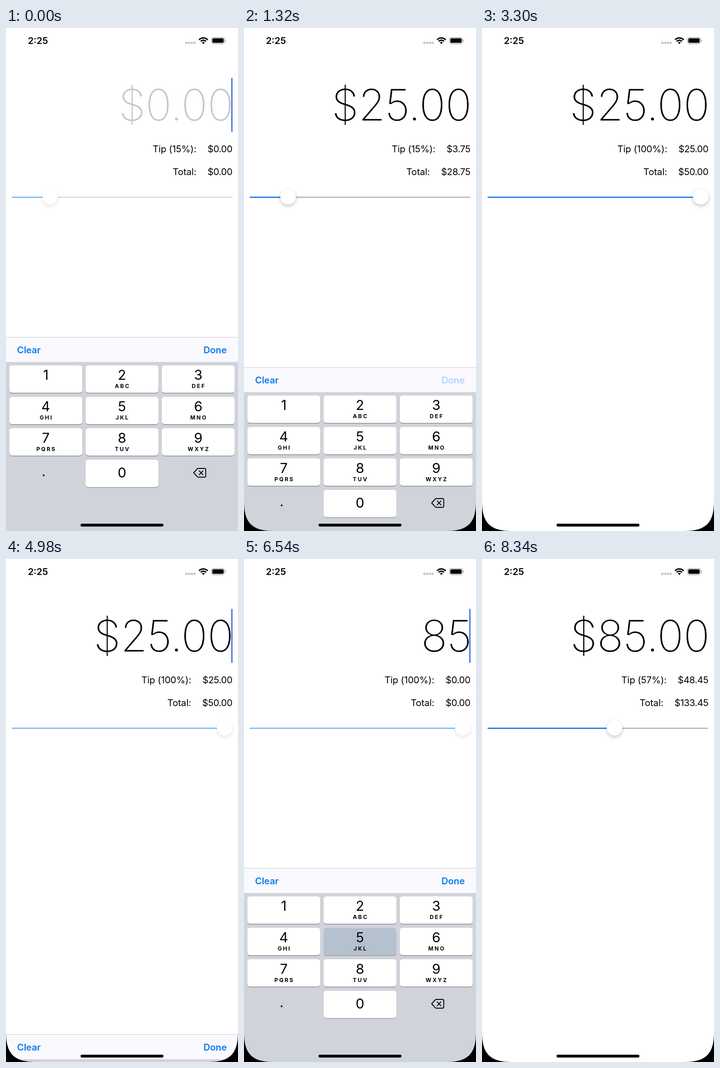
Recreate the animation shown at these times as an HTML page with a canvas. Size 509 by 1101 pixels, loop 8.4 s.

```html
<!DOCTYPE html>
<html lang="en">
<head>
<meta charset="utf-8">
<title>Tip calculator</title>
<style>
html, body { margin: 0; width: 100%; height: 100%; overflow: hidden; background: #fff; }
canvas { display: block; }
</style>
</head>
<body>
<canvas id="stage" width="509" height="1101"></canvas>
<script>
const W = 509, H = 1101, LOOP = 8400, STEP = 60;
const BLUE = '#0f7af5', BAR_BLUE = '#0a7aee';
const g = document.getElementById('stage').getContext('2d');
const clamp = v => Math.max(0, Math.min(1, v));
const money = v => '$' + v.toFixed(2);

// Timeline: what the amount field shows from each moment on
const entries = [[0, ''], [180, '2'], [480, '25'], [1320, '$25.00'],
  [5580, ''], [6180, '8'], [6480, '85'], [7080, '$85.00']];
// Key presses: key, down, up
const presses = [['2', 180, 240], ['5', 480, 780], ['8', 6180, 6360], ['5', 6480, 6780]];
// Caret: appears, starts to fade
const blinks = [[0, 760], [1140, 1900], [4980, 5260], [5580, 5900], [6180, 6760]];
// Slider thumb: time, centre x
const drag = [[0, 96.7], [1980, 96.7], [2220, 162], [2580, 162], [2640, 167.5],
  [2700, 167.5], [3300, 480], [7860, 480], [8340, 290.5], [LOOP, 290.5]];

const latest = (list, t) => list.filter(e => e[0] <= t).pop();
const isEditing = t => t < 1320 || (t >= 4980 && t < 7080);

function thumbAt(t) {
  const i = drag.findIndex(k => k[0] > t);
  const [t0, x0] = drag[i - 1], [t1, x1] = drag[i];
  const u = (t - t0) / (t1 - t0);
  return x0 + (x1 - x0) * u * u * (3 - 2 * u);
}

// Critically damped spring, 0 to 1
function spring(ms) {
  const x = Math.max(0, ms) * 0.026;
  return 1 - (1 + x) * Math.exp(-x);
}

function keyboardOffset(t) {
  if (t < 4900) return 424 * spring(t - 1293.2);
  if (t < 7000) return 424 * (1 - spring(t - 4954.7));
  return 424 * spring(t - 7065);
}

function caretAlpha(t) {
  return isEditing(t) ? 1 - clamp((t - latest(blinks, t)[1]) / 140) : 0;
}

// Opacity of a bar button tapped at the given moment
const tapped = (t, at) => t < at ? 1 : 0.3 + 0.7 * clamp((t - at - 60) / 240);

function pressLevel(key, t) {
  const hit = presses.find(([k, down, up]) => k === key && t >= down && t < up + 120);
  return hit ? 1 - clamp((t - hit[2] + 40) / 140) : 0;
}

function rect(x, y, w, h, color, r = 0) {
  g.fillStyle = color;
  g.beginPath();
  g.roundRect(x, y, w, h, r);
  g.fill();
}

function setFont(size, weight, spacing) {
  g.font = `${weight} ${size}px Inter, sans-serif`;
  g.letterSpacing = spacing + 'px';
}

function label(str, x, y, { size = 20.3, weight = 400, spacing = -0.1, color = '#000', align = 'left' } = {}) {
  setFont(size, weight, spacing);
  g.fillStyle = color;
  g.textAlign = align;
  g.fillText(str, x, y);
  return g.measureText(str).width;
}

function statusBar() {
  label('2:25', 70, 35, { weight: 600, spacing: 0, align: 'center' });
  for (let i = 0; i < 4; i++) rect(393.2 + i * 6, 30, 5, 5, '#c6c6c8', 1.8);

  g.strokeStyle = '#000';
  g.lineWidth = 3;
  for (const r of [13, 8]) {
    g.beginPath();
    g.arc(433, 34.8, r, -Math.PI * 0.76, -Math.PI * 0.24);
    g.stroke();
  }
  g.fillStyle = '#000';
  g.beginPath();
  g.moveTo(433, 35);
  g.arc(433, 35, 4.6, -Math.PI * 0.76, -Math.PI * 0.24);
  g.fill();

  g.strokeStyle = '#a5a5a7';
  g.lineWidth = 1.2;
  g.beginPath();
  g.roundRect(450.6, 20.6, 29, 14, 4.2);
  g.stroke();
  rect(452.6, 22.6, 25, 10, '#000', 2.6);
  rect(480.9, 25.3, 1.6, 4.8, '#a5a5a7', 1);
}

function amountField(t) {
  const entry = latest(entries, t)[1], str = entry || '$0.00';
  setFont(96, 200, -0.6);
  g.textAlign = 'left';
  g.fillStyle = entry ? '#000' : '#c5c5c8';
  const x = 493.7 - g.measureText(str).actualBoundingBoxRight;
  g.fillText(str, x, 203);
  // A white outline trims the strokes to a thinner weight
  g.strokeStyle = '#fff';
  g.lineWidth = 0.8;
  g.strokeText(str, x, 203);

  g.globalAlpha = caretAlpha(t);
  rect(494.3, 109, 2.6, 118.5, '#3763df', 1.2);
  g.globalAlpha = 1;
}

function resultRow(name, value, y) {
  const w = label(money(value), 496.7, y, { spacing: -0.35, align: 'right' });
  label(name, 496.7 - w - 24.6, y, { align: 'right' });
}

function slider(x, dim) {
  rect(12.3, 369.2, 484.4, 2.6, dim ? '#d9d9dc' : '#b3b3b6', 1.3);
  rect(12.3, 369.2, x - 12.3, 2.6, dim ? '#78bbf8' : BLUE, 1.3);
  g.save();
  g.shadowColor = `rgba(0,0,0,${dim ? 0.11 : 0.23})`;
  g.shadowBlur = 9;
  g.shadowOffsetY = 3.5;
  g.fillStyle = '#fff';
  g.beginPath();
  g.arc(x, 369.5, 17, 0, 7);
  g.fill();
  g.restore();
}

function backspace() {
  g.strokeStyle = '#000';
  g.lineWidth = 1.9;
  g.lineJoin = g.lineCap = 'round';
  g.beginPath();
  g.moveTo(411.8, 973.5);
  g.lineTo(419.6, 965);
  g.quadraticCurveTo(420.6, 964, 422, 964);
  g.lineTo(435, 964);
  g.quadraticCurveTo(438.3, 964, 438.3, 967.3);
  g.lineTo(438.3, 980);
  g.quadraticCurveTo(438.3, 983.3, 435, 983.3);
  g.lineTo(422, 983.3);
  g.quadraticCurveTo(420.6, 983.3, 419.6, 982.2);
  g.closePath();
  g.moveTo(423.9, 969.4);
  g.lineTo(432.1, 977.8);
  g.moveTo(432.1, 969.4);
  g.lineTo(423.9, 977.8);
  g.stroke();
}

function key(digit, letters, col, row, t) {
  const x = 7.3 + col * 167.2, y = 738.5 + row * 68.8, mid = x + 80;
  rect(x, y + 1.4, 160, 60, '#898b90', 6);
  rect(x, y, 160, 60, '#fff', 6);
  g.globalAlpha = pressLevel(digit, t);
  rect(x, y, 160, 60, '#b6c1cf', 6);
  g.globalAlpha = 1;
  label(digit, mid, y + (row === 3 ? 39.5 : 31.8), { size: 30, spacing: 0, align: 'center' });
  label(letters, mid + 1.3, y + 49.8, { size: 12, weight: 700, spacing: 2.7, align: 'center' });
}

function keyboard(t) {
  const off = keyboardOffset(t);
  if (off > 423.5) return;
  g.save();
  g.translate(0, Math.round(off));
  rect(0, 676.5, W, 55, '#faf9fd');
  rect(0, 676.2, W, 1.2, '#d3d4d6');
  rect(0, 731, W, 370, '#d1d3db');

  const bar = { weight: 600, color: BAR_BLUE };
  g.globalAlpha = t < 5580 ? 1 : tapped(t, 5580);
  label('Clear', 24.3, 711.5, bar);
  g.globalAlpha = t < 4900 ? tapped(t, 1320) : tapped(t, 7080);
  label('Done', 484.3, 711.5, { ...bar, align: 'right' });
  g.globalAlpha = 1;

  ['', 'ABC', 'DEF', 'GHI', 'JKL', 'MNO', 'PQRS', 'TUV', 'WXYZ']
    .forEach((s, i) => key(String(i + 1), s, i % 3, Math.floor(i / 3), t));
  key('0', '', 1, 3, t);
  label('.', 82.5, 981, { size: 30, spacing: 0, align: 'center' });
  backspace();
  g.restore();
}

// Smooth screen corners
function corners() {
  const reach = 65, pull = 18;
  g.fillStyle = '#000';
  for (const [edge, dir] of [[0, 1], [W, -1]]) {
    g.beginPath();
    g.moveTo(edge, H);
    g.lineTo(edge, H - reach);
    g.bezierCurveTo(edge, H - pull, edge + dir * pull, H, edge + dir * reach, H);
    g.fill();
  }
}

function draw(t) {
  rect(0, 0, W, H, '#fff');
  const x = thumbAt(t);
  const percent = Math.floor((x - 29) / 4.51 + 1e-6);
  const bill = t >= 7080 ? 85 : t >= 1320 && t < 5580 ? 25 : 0;
  const tip = bill * percent / 100;

  statusBar();
  amountField(t);
  resultRow(`Tip (${percent}%):`, tip, 272);
  resultRow('Total:', bill + tip, 321.7);
  slider(x, isEditing(t));
  keyboard(t);
  if (t >= 1320) corners();
  rect(163.5, 1085, 182, 6.2, '#000', 3.1);
}

function frame() {
  const t = performance.now() % LOOP;
  draw(Math.floor(t / STEP) * STEP);
  requestAnimationFrame(frame);
}
frame();
</script>
</body>
</html>
```
